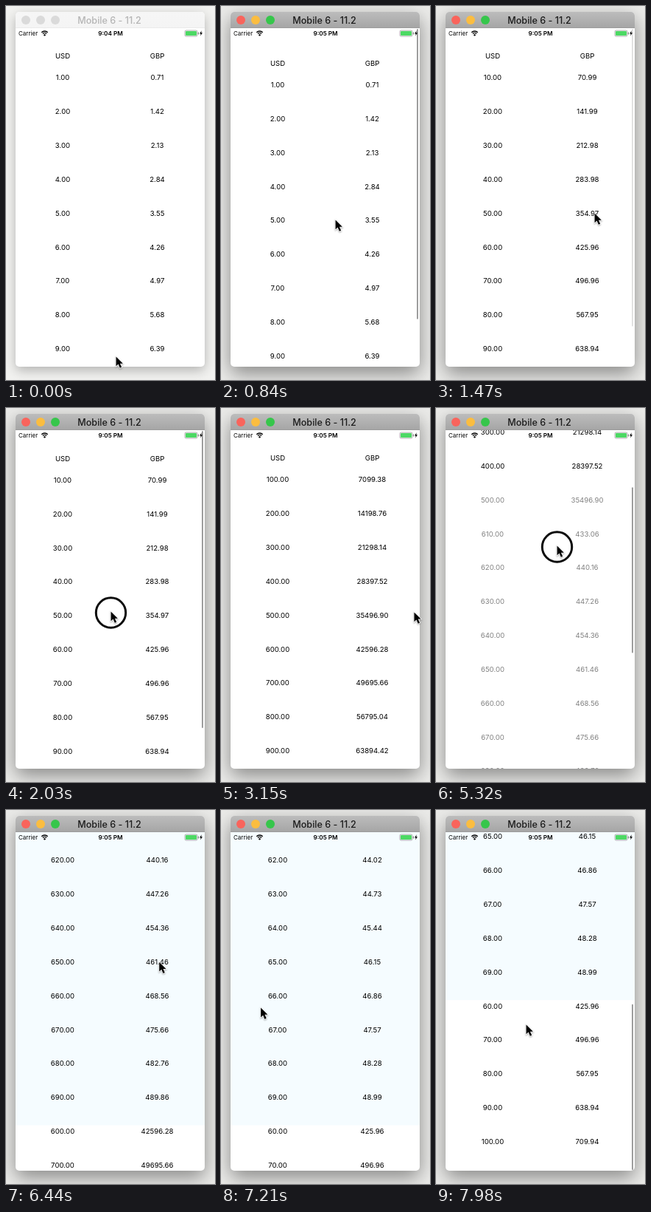
Write an HTML page with a canvas that moves like this. It is 284x506 px and loops after 8000 ms.

```html
<!DOCTYPE html>
<html lang="en">
<head>
<meta charset="utf-8">
<title>Currency table</title>
<style>
  html, body { margin: 0; width: 100%; height: 100%; overflow: hidden; background: #f1f1ef; }
  canvas { display: block; width: 284px; height: 506px; }
</style>
</head>
<body>
<canvas id="stage"></canvas>
<script>
const W = 284, H = 506, LOOP = 8000, STEP = 70;
const VIEW = { x: 13, y: 30, w: 257, h: 458 };
const ROW = 45.83, FIRST_ROW = 97, ROW_TOP = 8, CLOSED_HEIGHT = 519, RATE = 0.709938;
const FONT = 'Inter, Roboto, sans-serif';
const ACTIVE_AT = 140, SETTLE = 600, GLIDE = 0.414;

const canvas = document.getElementById('stage');
const ctx = canvas.getContext('2d');
const dpr = window.devicePixelRatio || 1;
canvas.width = W * dpr;
canvas.height = H * dpr;

// Pointer path, scrolling, scale and highlights all follow from these gestures.
const gesture = (kind, at, hold, from, to = from, dims = false) =>
  ({ kind, at, end: at + hold, from, to, dims });
const gestures = [
  gesture('drag', 420, 240, [153, 250], [155, 289]),
  gesture('swipe', 1140, 310, [95, 285], [215, 280]),
  gesture('drag', 1960, 140, [142, 274], [142, 276]),
  gesture('swipe', 2600, 340, [145, 278], [263, 276]),
  gesture('drag', 3430, 270, [150, 268], [148, 215]),
  gesture('tap', 4200, 120, [148, 215], [148, 215], true),
  gesture('drag', 5180, 280, [164, 267], [164, 105], true),
  gesture('swipe', 6580, 350, [208, 206], [33, 212]),
  gesture('drag', 7430, 270, [118, 440], [122, 290])
];
const ofKind = kind => gestures.filter(g => g.kind === kind);
const drags = ofKind('drag'), swipes = ofKind('swipe');
const openAt = ofKind('tap')[0].end;

const clamp = u => Math.min(1, Math.max(0, u));
const progress = (t, from, to) => clamp((t - from) / (to - from));
const smooth = u => u * u * (3 - 2 * u);
const mix = (a, b, u) => a + (b - a) * u;
const pulse = (t, on, off, rise, fade) =>
  Math.min(progress(t, on, on + rise), 1 - progress(t, off, off + fade));

function pointerAt(t) {
  let rest = [149, 474], since = 0;
  for (const g of gestures) {
    if (t < g.at) {
      const gap = g.at - since;
      const u = smooth(progress(t, since + gap * 0.4, since + gap * 0.9));
      return rest.map((v, i) => mix(v, g.from[i], u));
    }
    if (t < g.end) {
      const u = smooth(progress(t, g.at, g.end));
      return g.from.map((v, i) => mix(v, g.to[i], u));
    }
    rest = g.to;
    since = g.end;
  }
  return rest;
}

const contentHeight = t => CLOSED_HEIGHT + (t >= openAt ? 9 * ROW : 0);

// Drags move the list with the pointer, then it glides on or springs back.
function scrollAt(t) {
  let offset = 0;
  for (const g of drags) {
    if (t < g.at) break;
    const distance = g.from[1] - g.to[1];
    const remaining = (1 - progress(t, g.end, g.end + SETTLE)) ** 2;
    offset += distance * smooth(progress(t, g.at, g.end));
    if (offset < 0) offset *= 0.5 * remaining;
    else offset += Math.max(0, distance) * GLIDE * (1 - remaining);
    offset = Math.min(offset, contentHeight(t) - VIEW.h);
  }
  return offset;
}

function scaleAt(t) {
  return swipes.reduce((scale, g) => {
    if (t < mix(g.at, g.end, 0.8)) return scale;
    return g.to[0] > g.from[0] ? scale * 10 : scale / 10;
  }, 1);
}

const barAlphaAt = t =>
  Math.max(...drags.map(g => pulse(t, g.at, g.end + SETTLE, STEP, 300)));
const groupAlphaAt = t =>
  1 - 0.6 * Math.max(...gestures.filter(g => g.dims).map(g => pulse(t, g.at, g.at + 100, STEP, 250)));

function text(str, x, y, size, { color = '#000', weight = 400, align = 'center' } = {}) {
  ctx.font = `${weight} ${size}px ${FONT}`;
  ctx.textAlign = align;
  ctx.textBaseline = 'alphabetic';
  ctx.fillStyle = color;
  ctx.fillText(str, x, y + size * 0.36);
}

function box(x, y, w, h, r, color) {
  ctx.fillStyle = color;
  ctx.beginPath();
  ctx.roundRect(x, y, w, h, r);
  ctx.fill();
}

function disc(x, y, r, color) {
  ctx.fillStyle = color;
  ctx.beginPath();
  ctx.arc(x, y, r, 0, Math.PI * 2);
  ctx.fill();
}

function drawWindow(active) {
  ctx.fillStyle = active ? '#ececea' : '#f3f3f1';
  ctx.fillRect(0, 0, W, H);
  ctx.save();
  ctx.shadowColor = `rgba(0,0,0,${active ? 0.43 : 0.27})`;
  ctx.shadowBlur = (active ? 27 : 16) * dpr;
  ctx.shadowOffsetY = (active ? 9 : 5) * dpr;
  box(13, 8, 257, 480, 5, '#fff');
  ctx.restore();

  const bar = ctx.createLinearGradient(0, 8, 0, 30);
  bar.addColorStop(0, active ? '#bcbcbc' : '#f6f6f6');
  bar.addColorStop(1, active ? '#a5a5a5' : '#f4f4f4');
  box(13, 8, 257, 22, [5, 5, 0, 0], bar);
  ctx.fillStyle = active ? '#929292' : '#dedede';
  ctx.fillRect(13, 29.5, 257, 0.5);
  ['#f9645c', '#fbbd40', '#36c64b'].forEach((color, i) => {
    disc(27 + i * 20, 19, 6, active ? color : '#dadada');
  });
  text('Mobile 6 - 11.2', 140.5, 19.5, 12.6, { color: active ? '#1c1c1c' : '#b5b5b5', weight: 500 });
}

function drawStatus(active) {
  text('Carrier', 17, 37, 8, { align: 'left' });
  text(active ? '9:05 PM' : '9:04 PM', 142, 37, 8.2, { weight: 600 });

  ctx.strokeStyle = '#000';
  ctx.lineWidth = 1.3;
  for (const r of [3.6, 6]) {
    ctx.beginPath();
    ctx.arc(52.5, 40, r, Math.PI * 1.25, Math.PI * 1.75);
    ctx.stroke();
  }
  disc(52.5, 39.3, 1.2, '#000');

  ctx.strokeStyle = '#777';
  ctx.lineWidth = 0.6;
  ctx.beginPath();
  ctx.roundRect(243, 33, 17, 8, 1.8);
  ctx.stroke();
  box(244, 34, 15, 6, 1, '#4cd964');
  box(260.8, 35.5, 1.1, 3, 0.5, '#777');
  ctx.fillStyle = '#000';
  ctx.fill(new Path2D('M265.8 33.3 L263 37.6 H264.8 L264.2 40.6 L267 36.3 H265.2 Z'));
}

function pair(left, right, y) {
  text(left, 77, y, 9.6);
  text(right, 205.5, y, 9.6);
}

function drawTable(t, offset) {
  const scale = scaleAt(t), groupAlpha = groupAlphaAt(t);
  let y = FIRST_ROW - offset;
  pair('USD', 'GBP', y - 29);
  for (let i = 1; i <= 10; i++) {
    const amount = i * scale;
    ctx.globalAlpha = i === 5 ? groupAlpha : 1;
    pair(amount.toFixed(2), (amount * RATE * scale).toFixed(2), y);
    y += ROW;
    if (i === 5 && t >= openAt) {
      ctx.globalAlpha = clamp(2 * groupAlpha - 1);
      box(VIEW.x, y - ROW_TOP, VIEW.w, ROW * 9, 0, '#f5fcff');
      ctx.globalAlpha = groupAlpha;
      for (let j = 1; j <= 9; j++, y += ROW) {
        const part = (6 + j / 10) * scale;
        pair(part.toFixed(2), (part * RATE).toFixed(2), y);
      }
    }
  }
  ctx.globalAlpha = 1;
}

function drawScrollbar(t, offset) {
  const rail = VIEW.h - 2, content = contentHeight(t);
  const length = rail * VIEW.h / content + Math.min(0, offset);
  ctx.globalAlpha = barAlphaAt(t);
  box(266, 31 + Math.max(0, offset) * rail / content, 2, length, 1, '#9e9e9e');
  ctx.globalAlpha = 1;
}

function drawPointer(t) {
  const [x, y] = pointerAt(t);
  if (gestures.some(g => t >= g.at && t < g.end)) {
    ctx.strokeStyle = '#0c0c0c';
    ctx.lineWidth = 3;
    ctx.beginPath();
    ctx.arc(x + 0.5, y + 2, 20.2, 0, Math.PI * 2);
    ctx.stroke();
  }
  ctx.save();
  ctx.translate(x, y);
  ctx.scale(0.94, 0.94);
  ctx.shadowColor = 'rgba(0,0,0,.35)';
  ctx.shadowBlur = 2 * dpr;
  ctx.shadowOffsetY = dpr;
  const arrow = new Path2D('M0.6 0.5 V14.2 L3.8 11.2 L6.2 16.8 L8.7 15.7 L6.3 10.3 H10.5 Z');
  ctx.strokeStyle = '#fff';
  ctx.lineWidth = 1.6;
  ctx.stroke(arrow);
  ctx.shadowColor = 'transparent';
  ctx.fillStyle = '#000';
  ctx.fill(arrow);
  ctx.restore();
}

function draw(t) {
  const active = t >= ACTIVE_AT, offset = scrollAt(t);
  ctx.setTransform(dpr, 0, 0, dpr, 0, 0);
  drawWindow(active);
  ctx.save();
  ctx.beginPath();
  ctx.roundRect(VIEW.x, VIEW.y, VIEW.w, VIEW.h, [0, 0, 5, 5]);
  ctx.clip();
  drawTable(t, offset);
  drawScrollbar(t, offset);
  drawStatus(active);
  ctx.restore();
  drawPointer(t);
}

const start = performance.now();
function tick() {
  const t = (performance.now() - start) % LOOP;
  draw(Math.floor(t / STEP) * STEP);
  requestAnimationFrame(tick);
}
tick();
</script>
</body>
</html>
```
